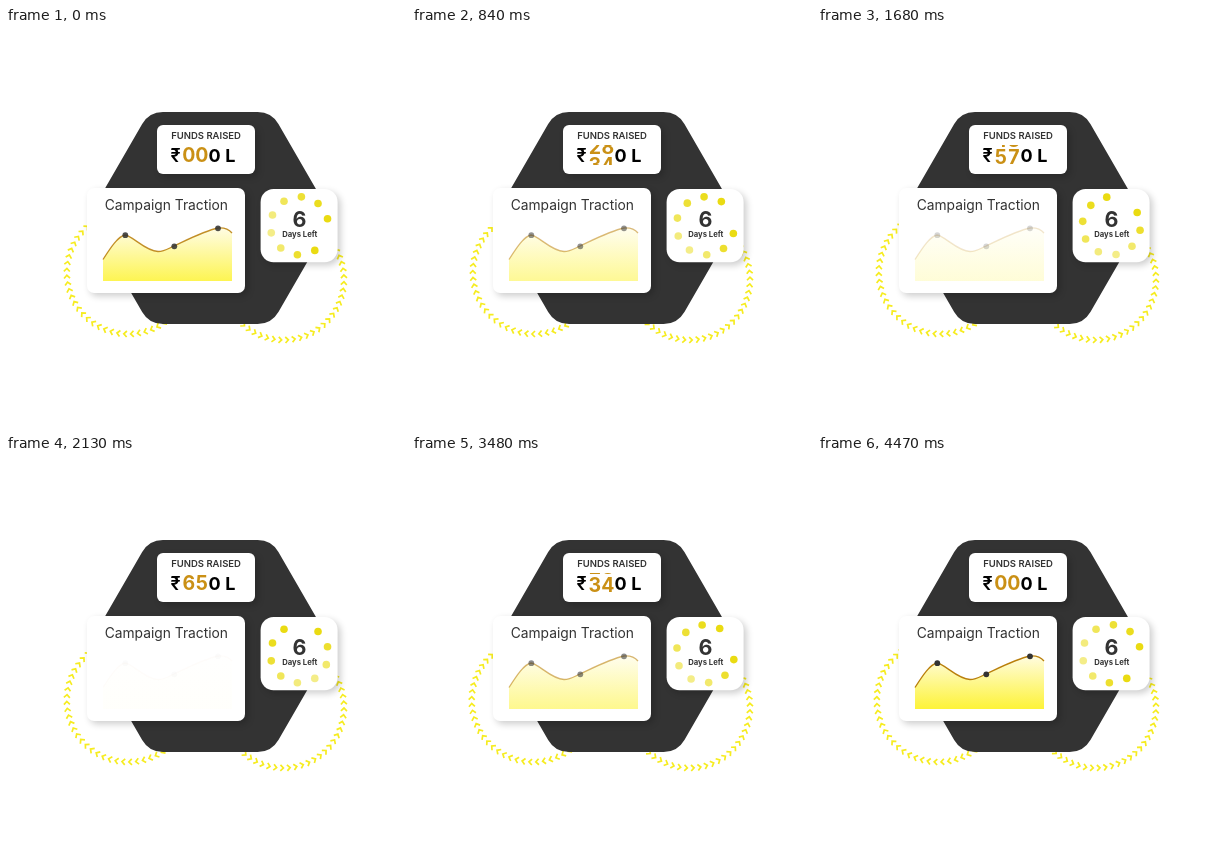
Write an HTML page with a canvas that moves like this. It is 400 by 400 pixels and loops after 4500 ms.

```html
<!DOCTYPE html>
<html lang="en">
<head>
<meta charset="utf-8">
<title>Campaign dashboard</title>
<style>
  html, body { margin: 0; width: 100%; height: 100%; overflow: hidden; background: #fff; }
  canvas { display: block; width: 400px; height: 400px; }
</style>
</head>
<body>
<canvas id="stage"></canvas>
<script>
const LOOP = 4500;
const TAU = Math.PI * 2;
const RAD = Math.PI / 180;
const DARK = '#333333';
const YELLOW = '#f6ec20';
const TOTALS = ['00', '15', '28', '34', '43', '57', '65'];
const DOT_ALPHA = [1, 0.88, 0.62, 0.5, 0.55, 0.7, 0.85, 0.95, 1];

const canvas = document.getElementById('stage');
const ctx = canvas.getContext('2d');
const ratio = window.devicePixelRatio || 1;
canvas.width = canvas.height = 400 * ratio;

const clamp = v => Math.max(0, Math.min(1, v));
const progress = (t, from, to) => clamp((t - from) / (to - from));

function text(str, x, y, weight, size, color = DARK, align = 'left') {
  ctx.font = `${weight} ${size}px Inter, sans-serif`;
  ctx.fillStyle = color;
  ctx.textAlign = align;
  ctx.fillText(str, x, y);
}

function disc(x, y, r, color) {
  ctx.fillStyle = color;
  ctx.beginPath();
  ctx.arc(x, y, r, 0, TAU);
  ctx.fill();
}

function card(x, y, w, h, r) {
  ctx.save();
  ctx.shadowColor = 'rgba(0,0,0,0.2)';
  ctx.shadowBlur = 7 * ratio;
  ctx.shadowOffsetX = ctx.shadowOffsetY = 3 * ratio;
  ctx.fillStyle = '#fff';
  ctx.beginPath();
  ctx.roundRect(x, y, w, h, r);
  ctx.fill();
  ctx.restore();
}

function hexagon() {
  const corner = i => [204.3 + 122.4 * Math.cos(i * 60 * RAD), 190 + 122.4 * Math.sin(i * 60 * RAD)];
  ctx.beginPath();
  ctx.moveTo(204.3, 296);
  for (let i = 2; i < 8; i++) ctx.arcTo(...corner(i), ...corner(i + 1), 24);
  ctx.closePath();
  ctx.fillStyle = DARK;
  ctx.fill();
}

// Chevrons travel along a circular arc from one angle to the other.
function chevrons(cx, cy, r, from, to, phase) {
  const step = 6.4 * Math.sign(to - from);
  const count = Math.floor((to - from) / step);
  ctx.strokeStyle = YELLOW;
  ctx.lineWidth = 1.7;
  for (let i = 0; i < count; i++) {
    const angle = (from + (i + phase) * step) * RAD;
    ctx.save();
    ctx.translate(cx + r * Math.cos(angle), cy + r * Math.sin(angle));
    ctx.rotate(angle + Math.sign(step) * Math.PI / 2);
    ctx.beginPath();
    ctx.moveTo(-1.5, -3);
    ctx.lineTo(1.5, 0);
    ctx.lineTo(-1.5, 3);
    ctx.stroke();
    ctx.restore();
  }
}

function funds(t) {
  card(151, 97, 98, 49, 6);
  text('FUNDS RAISED', 165.2, 111.2, 600, 9.5);
  text('₹', 164.6, 134, 600, 18, '#000');
  text('0', 202.4, 134, 700, 18, '#000');
  text('L', 219.3, 134, 700, 18, '#000');

  const row = 6 * (progress(t, 0, 2060) - progress(t, 2480, 4440));
  ctx.save();
  ctx.beginPath();
  ctx.rect(175, 117, 28, 20);
  ctx.clip();
  TOTALS.forEach((value, i) => {
    const y = 134.4 + (i - row) * 17.7;
    [...value].forEach((digit, k) =>
      text(digit, 182.8 + k * 13, y, 700, 19.5, '#ca9015', 'center'));
  });
  ctx.restore();
}

function curve() {
  ctx.moveTo(97, 231.5);
  ctx.bezierCurveTo(105, 219, 112, 208.5, 119, 207);
  ctx.bezierCurveTo(127, 208, 139, 223, 152, 223.5);
  ctx.bezierCurveTo(159, 223.5, 163, 220, 168, 218);
  ctx.bezierCurveTo(183, 211, 198, 203, 212, 200);
  ctx.bezierCurveTo(218, 199.5, 223, 201.5, 226, 205);
}

function chart(t) {
  card(81, 160, 158, 105, 7);
  text('Campaign Traction', 98.7, 182, 400, 13.8);

  ctx.save();
  ctx.globalAlpha = t < 2180 ? 0.87 * (1 - t / 2180) : progress(t, 2180, 4470);
  const fill = ctx.createLinearGradient(0, 200, 0, 253);
  fill.addColorStop(0, '#fffce0');
  fill.addColorStop(1, '#fdf338');
  ctx.beginPath();
  curve();
  ctx.lineTo(226, 253);
  ctx.lineTo(97, 253);
  ctx.closePath();
  ctx.fillStyle = fill;
  ctx.fill();

  ctx.beginPath();
  curve();
  ctx.strokeStyle = '#b97f0c';
  ctx.lineWidth = 1.3;
  ctx.stroke();
  for (const [x, y] of [[119.3, 207.2], [168.3, 218.3], [212, 200.3]]) disc(x, y, 2.9, DARK);
  ctx.restore();
}

function countdown(t) {
  card(254.6, 161, 77, 73.3, 13);
  const gap = 22 - 109 * (progress(t, 0, 2150) - progress(t, 2150, 4470));
  DOT_ALPHA.forEach((alpha, i) => {
    const angle = (gap + 36 * (i + 1)) * RAD;
    ctx.globalAlpha = alpha;
    disc(293.4 + 29 * Math.cos(angle), 197.8 + 29 * Math.sin(angle), 3.8, '#eadb12');
  });
  ctx.globalAlpha = 1;
  text('6', 293.4, 199.4, 700, 21.5, DARK, 'center');
  text('Days Left', 293.8, 209, 700, 7.7, DARK, 'center');
}

function draw(now) {
  const t = now % LOOP;
  ctx.setTransform(ratio, 0, 0, ratio, 0, 0);
  ctx.fillStyle = '#fff';
  ctx.fillRect(0, 0, 400, 400);

  const phase = (t / 500) % 1;
  chevrons(122.3 - 2 * progress(t, 2200, 4470), 244.5, 61.5, 48, 235, phase);
  chevrons(277.5, 251.5, 60.5, 138, -36, phase);
  hexagon();
  funds(t);
  chart(t);
  countdown(t);
}

const start = performance.now();
function tick() {
  draw(performance.now() - start);
  requestAnimationFrame(tick);
}
tick();
</script>
</body>
</html>
```
